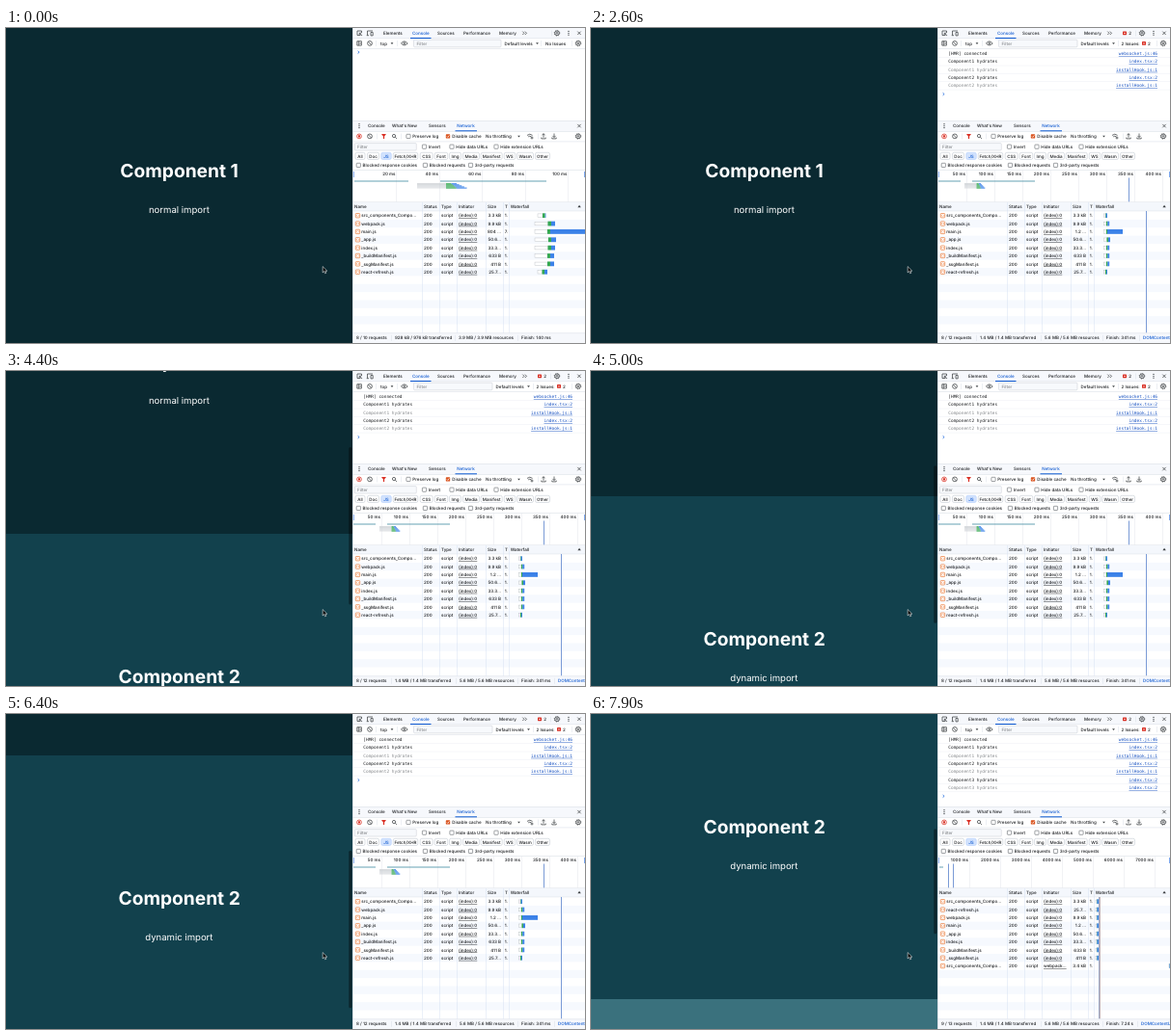
Write an HTML page that moves like this. It is 600 px wide and 327 px high and loops after 8000 ms.

```html
<!DOCTYPE html>
<html lang="en">
<head>
<meta charset="utf-8">
<title>Hydration demo</title>
<style>
html, body { margin: 0; width: 100%; height: 100%; overflow: hidden; background: #fff; }
svg { display: block; width: 600px; height: 327px; text-rendering: geometricPrecision; }
text { font: 500 4.5px Inter, "Open Sans", sans-serif; fill: #1b1d20; white-space: pre; }
.mono { font: 4.46px "DejaVu Sans Mono", monospace; }
.dim { fill: #85888c; }
.blue { fill: #0b57d0; }
.link { fill: #1550c0; text-decoration: underline; }
.under { text-decoration: underline; }
.mid { text-anchor: middle; }
.end { text-anchor: end; }
.title { font: 700 19.2px Inter, sans-serif; fill: #fff; text-anchor: middle; }
.sub { font: 400 9.55px Inter, sans-serif; fill: #fff; text-anchor: middle; }
.ico { fill: none; stroke: #3c4043; stroke-width: .75; }
</style>
</head>
<body>
<svg id="stage" viewBox="0 0 600 327"></svg>
<script>
const LOOP = 8000;
const LOADED = 200, THIRD = 7200;

// [time, scroll offset]
const SCROLL = [[0, 0], [2700, 0], [2800, 12], [3000, 45], [3400, 89], [3700, 107], [3900, 107],
  [4050, 119], [4400, 158], [5600, 235], [7000, 320], [7200, 327], [7500, 341], [7900, 358], [8000, 360]];

// [time, text, link, dimmed]
const LOGS = [
  [200, '[HMR] connected', 'websocket.js:46'],
  [200, 'Component1 hydrates', 'index.tsx:2'],
  [200, 'Component1 hydrates', 'installHook.js:1', 1],
  [300, 'Component2 hydrates', 'index.tsx:2'],
  [300, 'Component2 hydrates', 'installHook.js:1', 1],
  [7200, 'Component3 hydrates', 'index.tsx:2'],
  [7200, 'Component3 hydrates', 'index.tsx:2', 1]
];
const PITCH = 8.36;

const SIZES = {
  'src_components_Compo…': '3.3 kB', 'webpack.js': '9.9 kB', 'main.js': '1.2 …', '_app.js': '50.6…',
  'index.js': '33.3…', '_buildManifest.js': '633 B', '_ssgManifest.js': '411 B', 'react-refresh.js': '25.7…'
};
const FILES = Object.keys(SIZES);

const text = (x, y, s, cls = '') => `<text x="${x}" y="${y + 1.65}" class="${cls}">${s}</text>`;
const rect = (x, y, w, h, fill, more = '') => `<rect x="${x}" y="${y}" width="${w}" height="${h}" fill="${fill}" ${more}/>`;
const path = (d, more = '') => `<path class="ico" d="${d}" ${more}/>`;
const hline = (y, c = '#d5dae3', x = 359) => rect(x, y, 600 - x, .5, c);
const vline = (x, y, h, c = '#d9dee7') => rect(x, y, .5, h, c);
const group = (id, body) => `<g id="${id}">${body}</g>`;

const dots = (x, y) => [-1.9, 0, 1.9].map(d => `<circle cx="${x}" cy="${y + d}" r=".65" fill="#3c4043"/>`).join('');
const cross = (x, y) => path(`M${x - 1.7} ${y - 1.7}l3.4 3.4m0 -3.4l-3.4 3.4`);
const arrow = (x, y) => `<path d="M${x - 1.4} ${y - .7}h2.8l-1.4 1.7z" fill="#3c4043"/>`;
const ring = (x, y, r, more = '') => `<circle class="ico" cx="${x}" cy="${y}" r="${r}" ${more}/>`;
const gear = (x, y) => ring(x, y, 2.3) + ring(x, y, .8) + ring(x, y, 2.8, 'stroke-dasharray="1.1 1.1"');
const clear = (x, y) => ring(x, y, 2.4) + path(`M${x - 1.6} ${y - 1.6}l3.2 3.2`);
const check = (x, y, on) => on
  ? rect(x - 2.2, y - 2.2, 4.4, 4.4, '#d9531e', 'rx=".7"') + path(`M${x - 1.2} ${y}l1 1 1.6 -2`, 'style="stroke:#fff"')
  : rect(x - 2.1, y - 2.1, 4.2, 4.2, '#fff', 'rx=".6" stroke="#5f6368" stroke-width=".6"');
const badge = (x, y) => rect(x - 2, y - 1.9, 4, 3.8, '#d93025', 'rx=".6"') + rect(x - .9, y - .4, 1.8, .8, '#fff');
const field = (x, y, w, h) => rect(x, y, w, h, '#f7f9fc', 'rx="1" stroke="#c6cbd3" stroke-width=".5"');

function page() {
  const parts = ['#0a2931', '#12414d', '#3a717d'].map((c, i) => {
    const y = i * 327;
    return `<g id="part${i}">` + rect(0, y, 360, 328, c) +
      `<text class="title" x="179.6" y="${y + 155.2}">Component ${i + 1}</text>` +
      `<text class="sub" x="179.4" y="${y + 191.6}">${i ? 'dynamic' : 'normal'} import</text></g>`;
  });
  return group('page', parts.join('')) +
    '<rect id="thumb" x="355.3" width="3" rx="1.5" fill="#000" fill-opacity=".42"/>' +
    '<path d="M328.2 247.6v6.3l1.5 -1.3 1 2.2 1.1 -.5 -1 -2.1h2z" fill="#000" stroke="#e8eef0" stroke-width=".6"/>';
}

function topBars() {
  const tabs = [[391, 'Elements'], [421, 'Console', 'blue'], [447, 'Sources'], [474, 'Performance'], [511, 'Memory']];
  return rect(359, 0, 241, 327, '#fff') + rect(359, 0, 241, 10.7, '#f6f8fc') +
    path('M367.5 7.5h-3.5v-4.5h4.5v2M366.3 5.2l2.8 2.8m-2.8 -.9v-1.9h1.9') +
    path('M374.5 7.5v-4.5h5.5M376 7.7h-2.3M378 4.5h2.2v3.4h-2.2z') +
    tabs.map(a => text(a[0], 5.3, a[1], a[2])).join('') +
    path('M535.3 3.6l1.7 1.7-1.7 1.7m2.5 -3.4l1.7 1.7-1.7 1.7') +
    gear(571, 5.3) + dots(583, 5.3) + cross(594, 5.3) + hline(10.6) + rect(419, 10, 21.5, 1, '#0b57d0') +
    path('M363.8 13.7h4.6v4.4h-4.6zM365.3 13.7v4.4M366.3 14.9l1.3 1-1.3 1') + clear(377, 15.9) +
    vline(383, 13, 6) + text(388, 15.9, 'top') + arrow(400, 15.9) + vline(405.5, 13, 6) +
    path('M409.4 15.9q3.4 -4 6.8 0q-3.4 4 -6.8 0z') + ring(412.8, 15.9, 1) +
    gear(593, 15.9) + hline(21.1);
}

function issueBar(busy) {
  const x = busy ? 507.5 : 516.5;
  return field(422.5, 12.2, x - 426, 7.6) + text(425.5, 15.9, 'Filter', 'dim') +
    text(x, 15.9, 'Default levels') + arrow(x + 34, 15.9) +
    (busy
      ? badge(553, 5.3) + text(557.3, 5.3, '2') + vline(564.5, 2.5, 6) + vline(546, 13, 6) +
        text(549.5, 15.9, '2 Issues:') + badge(573, 15.9) + text(577, 15.9, '2')
      : vline(565, 2.5, 6) + vline(554.5, 13, 6) + text(559, 15.9, 'No Issues')) +
    vline(586.5, 13, 6);
}

function logs() {
  return LOGS.map(([, s, link, dim], i) => {
    const y = 26.4 + i * PITCH;
    return group('log' + i, text(370.3, y, s, 'mono' + (dim ? ' dim' : '')) +
      text(587, y, link, 'mono link end') + hline(y + 4, '#eceff4'));
  }).join('') + '<path id="prompt" d="M364.6 -1.3l1.5 1.3-1.5 1.3" fill="none" stroke="#1a66dc" stroke-width=".8"/>';
}

function netBars() {
  const chips = [[367, 10, 'All'], [380.5, 12, 'Doc'], [394, 10.5, 'JS'], [414, 25.5, 'Fetch/XHR'], [435.7, 13, 'CSS'],
    [451, 13.5, 'Font'], [465.5, 12, 'Img'], [482, 17, 'Media'], [503.2, 22, 'Manifest'], [522, 11.5, 'WS'],
    [538, 17, 'Wasm'], [556, 15, 'Other']];
  const checks = [[417, 112.4, 'Preserve log'], [458, 112.4, 'Disable cache', 1], [433.5, 123.2, 'Invert'],
    [462, 123.2, 'Hide data URLs'], [508, 123.2, 'Hide extension URLs'], [365.3, 142.4, 'Blocked response cookies'],
    [434.4, 142.4, 'Blocked requests'], [481.5, 142.4, '3rd-party requests']];
  return rect(359, 96.4, 241, 10.8, '#f6f8fc') + hline(96.2) + dots(366, 101.6) +
    text(375, 101.6, 'Console') + text(400, 101.6, "What's New") + text(438, 101.6, 'Sensors') +
    text(467.3, 101.6, 'Network', 'blue') + cross(594, 101.6) + hline(107) + rect(465.5, 106.3, 22.5, 1, '#0b57d0') +
    ring(366, 112.4, 2.4, 'style="stroke:#d93025"') + rect(364.9, 111.3, 2.2, 2.2, '#d93025', 'rx=".4"') +
    clear(377, 112.4) + vline(384, 109.5, 6) +
    '<path d="M389 110h5l-1.9 2.4v2.5h-1.2v-2.5z" fill="#d93025"/>' +
    ring(402, 112, 1.6) + path('M403.2 113.2l1.7 1.7') + vline(409, 109.5, 6) +
    checks.map(([x, y, s, on]) => check(x, y, on) + text(x + 4.3, y, s)).join('') +
    text(497, 112.4, 'No throttling') + arrow(531.5, 112.4) +
    path('M540 111.4q2.8 -2.4 5.6 0M541.2 112.9q1.6 -1.4 3.2 0') + ring(545, 114, 1) + vline(551, 109.5, 6) +
    path('M557 113.7v-4m-1.6 1.6l1.6 -1.6 1.6 1.6M554.8 113.6v1.3h4.4v-1.3') +
    path('M568 109.5v4m-1.6 -1.6l1.6 1.6 1.6 -1.6M565.8 113.6v1.3h4.4v-1.3') +
    gear(593, 112.4) + hline(117.7) +
    field(361.3, 119.6, 64, 7.4) + text(364, 123.2, 'Filter', 'dim') +
    chips.map(([x, w, s]) => {
      const on = s == 'JS';
      return rect(x - w / 2, 129.3, w, 7.2, on ? '#d3e3fd' : '#fff', `rx="1.7" stroke="${on ? '#a8c7fa' : '#b9c0cb'}" stroke-width=".5"`) +
        text(x, 132.9, s, 'mid' + (on ? ' blue' : ''));
    }).join('') + hline(147.2);
}

// bars: [wait, green, blue, end]
function bar(y, [a, g, b, e]) {
  return rect(a, y - 1.8, g - a, 3.6, '#fff', 'stroke="#b5b9bf" stroke-width=".4"') +
    rect(g, y - 2.4, b - g, 4.8, '#35a853') + rect(b, y - 2.4, e - b, 4.8, '#3b82e8');
}

function network(n) {
  const { step, first, last, pitch, files, bars, view, lines, foot } = n;
  let out = '';
  for (let v = first, x = 360 + pitch; v <= last; v += step, x += pitch)
    out += vline(x, 147.5, 33, '#e2e5ea') + text(x - 1, 151.1, v + ' ms', 'end');
  out += view + rect(359.8, 149, 1, 6, '#7faaf0') + rect(599, 149, 1, 6, '#7faaf0');
  out += hline(180.6) + rect(359, 181, 241, 8.6, '#f4f7fc');
  [[361, 'Name'], [433, 'Status'], [451, 'Type'], [469, 'Initiator'], [499, 'Size'], [517, 'T'], [522.8, 'Waterfall']]
    .forEach(([x, s]) => out += text(x, 185, s));
  out += '<path d="M592.4 186.2l1.7 -2.5 1.7 2.5z" fill="#3c4043"/>' + hline(189.7);
  for (let i = 1; i < 15; i += 2)
    out += rect(359, 190.5 + i * PITCH, 241, PITCH, '#f6f9fe');
  [431.3, 449.2, 467.2, 497.2, 515.2, 521.2].forEach(x => out += vline(x, 181, 135.8, '#d6e0f3'));
  files.forEach((f, i) => {
    const y = 194.7 + i * PITCH, extra = i == 8, main = f == 'main.js';
    out += rect(362.3, y - 2.2, 4.4, 4.4, '#fff', 'rx=".7" stroke="#e8712b" stroke-width=".65"') +
      path(`M364.1 ${y - 1}l-.8 1 .8 1m.9 -2l.8 1-.8 1`, 'style="stroke:#e8712b;stroke-width:.5"') +
      text(368.3, y, f) + text(433, y, '200') + text(451, y, 'script') +
      text(469, y, extra ? 'webpack…' : '(index):0', 'under') +
      text(513, y, extra ? '3.4 kB' : main && n.mainSize || SIZES[f], 'end') +
      text(516.8, y, main && n.mainSize ? '7.' : '1.') + bar(y, bars[i]);
  });
  out += lines + rect(359, 316.6, 241, 10.4, '#f6f8fc') + hline(316.6);
  foot.forEach(([x, s, cls], i) => out += (i ? vline(x - 3.8, 318.8, 6) : '') + text(x, 321.7, s, cls));
  return out;
}

const seg = (x, e, y, c, h = .8) => rect(x, y, e - x, h, c);
const mark = (x, y, h) => rect(x, y, 1, h, '#7b9bd6');
const GREEN = '#35a853', BLUE = '#3b82e8', GREY = '#c9cdd2', TEAL = '#3f8aa0';

// Stacked request bars in the overview strip
function cluster(a, g, e) {
  let out = '';
  for (let i = 0; i < 5; i++) {
    const y = 161.2 + i * 1.1, k = (e - g) * (.5 + .12 * i);
    out += seg(a, g, y, GREY, .7) + seg(g, g + k * .5, y, GREEN, 1) + seg(g + k * .5, g + k, y, BLUE, 1);
  }
  return out;
}

const total = '1.4 MB / 1.4 MB transferred', res = '5.6 MB / 5.6 MB resources';
const wide = [548, 561.5, 565, 569];
const thin = [531.5, 534, 535.3, 537.2];
const tiny = [523, 524, 524.5, 526];
const NETS = [
  { step: 20, first: 20, last: 100, pitch: 44.5, files: FILES, mainSize: '804 …',
    bars: [[551, 556, 558.7, 559.4], wide, [548, 561, 564, 600], [548, 562, 565, 570], wide,
      [548, 561, 564, 568], [548, 561, 564, 568], [551, 555.5, 558, 561]],
    view: seg(361, 417, 158.6, TEAL) + seg(450, 560, 158.6, TEAL) + cluster(426, 456, 478),
    lines: '',
    foot: [[363, '8 / 10 requests'], [403, '928 kB / 976 kB transferred'], [469, '3.9 MB / 3.9 MB resources'], [534, 'Finish: 140 ms']] },
  { step: 50, first: 50, last: 400, pitch: 29, files: FILES,
    bars: [[531.5, 533, 533.7, 535], thin, [531.5, 534, 535, 551], [531.5, 534.5, 536, 538], thin, thin, thin, [531.5, 533, 534, 535]],
    view: seg(360, 383, 158.6, TEAL) + seg(395, 460, 158.6, TEAL) + cluster(387, 399.5, 408.5) + mark(557, 155.5, 25),
    lines: mark(575, 190, 126.6),
    foot: [[363, '8 / 12 requests'], [403, total], [470, res], [534, 'Finish: 341 ms'], [572, 'DOMContentLoaded: 335 ms', 'blue']] },
  { step: 1000, first: 1000, last: 7000, pitch: 32, files: [FILES[0], FILES[7], ...FILES.slice(1, 7), FILES[0]],
    bars: [tiny, tiny, tiny, [523, 524, 524.4, 526.8], tiny, tiny, tiny, tiny, [599, 599.3, 599.5, 600]],
    view: seg(361, 365, 158.6, TEAL) + mark(370, 155.5, 25) + mark(375, 155.5, 25),
    lines: rect(526, 190, 1, 126.6, '#9fabc8') + rect(527, 190, 1, 126.6, '#c3b4b8'),
    foot: [[363, '9 / 13 requests'], [403, total], [470, res], [534, 'Finish: 7.24 s'], [570, 'DOMContentLoaded: 335 ms', 'blue']] }
];

document.getElementById('stage').innerHTML = page() + topBars() +
  group('idle', issueBar(false)) + group('busy', issueBar(true)) + logs() + netBars() +
  NETS.map((n, i) => group('net' + i, network(n))).join('') + vline(359, 0, 327, '#b9c2cc');

const el = id => document.getElementById(id);
const show = (id, on) => el(id).style.display = on ? '' : 'none';

function scrollAt(t) {
  const i = SCROLL.findIndex(k => k[0] > t);
  const [t0, a] = SCROLL[i - 1], [t1, b] = SCROLL[i];
  return a + (b - a) * (t - t0) / (t1 - t0);
}

function draw(t) {
  const s = scrollAt(t), third = t >= THIRD, full = third ? 981 : 654;
  el('page').setAttribute('transform', `translate(0 ${-Math.round(s)})`);
  show('part2', third);
  show('thumb', s > 0);
  el('thumb').setAttribute('y', s / full * 327);
  el('thumb').setAttribute('height', 327 * 327 / full);
  const busy = t >= LOADED, net = third ? 2 : busy ? 1 : 0;
  show('idle', !busy);
  show('busy', busy);
  NETS.forEach((n, i) => show('net' + i, i == net));
  let rows = 0;
  LOGS.forEach((l, i) => {
    show('log' + i, t >= l[0]);
    if (t >= l[0]) rows++;
  });
  el('prompt').setAttribute('transform', `translate(0 ${rows ? 26.8 + rows * PITCH : 25.2})`);
}

const start = performance.now();
function tick() {
  draw((performance.now() - start) % LOOP);
  requestAnimationFrame(tick);
}
tick();
</script>
</body>
</html>
```
